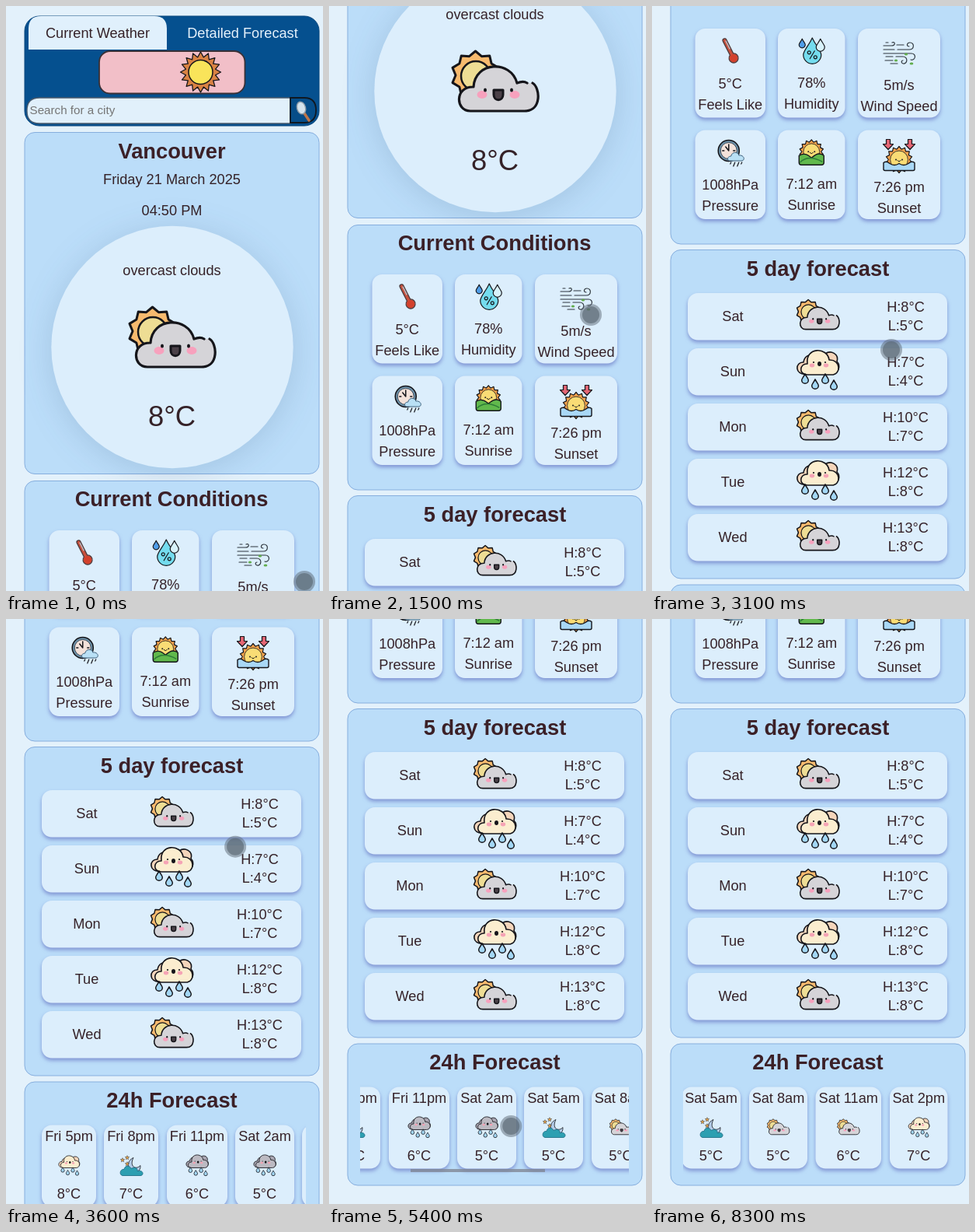
These frames come from a looping animation (408 by 752 pixels, 8400 ms). An HTML page:

```html
<!DOCTYPE html>
<html lang="en">
<head>
<meta charset="utf-8">
<title>Weather</title>
<style>
  html, body { margin: 0; width: 100%; height: 100%; overflow: hidden; background: #e3f1fb; }
  svg { display: block; width: 100%; height: 100%; }
  text { font: 18.2px "Liberation Sans", Arial, sans-serif; fill: #352228; text-anchor: middle; }
  .title { font-size: 27.3px; font-weight: bold; fill: #3b2027; }
  .big { font-size: 36.4px; }
  .panel { fill: #bbddf9; stroke: #86aede; }
  .card { fill: #dceefc; filter: drop-shadow(0 3px 2.5px rgba(80, 90, 180, .55)); }
  .disc { fill: #dceefc; filter: drop-shadow(0 5px 20px rgba(40, 70, 110, .17)); }
  .line { fill: none; stroke: #15151a; stroke-linecap: round; stroke-linejoin: round; }
  .ink { stroke: #15151a; stroke-linejoin: round; }
</style>
</head>
<body>
<svg id="stage" viewBox="0 0 408 752"></svg>
<script>
const LOOP = 8400, STEP = 100;

// Markup helpers
const text = (s, x, y, cls = '', extra = '') => `<text x="${x}" y="${y}" class="${cls}" ${extra}>${s}</text>`;
const rect = (x, y, w, h, r, attrs) => `<rect x="${x}" y="${y}" width="${w}" height="${h}" rx="${r}" ${attrs}/>`;
const card = (x, y, w, h) => rect(x, y, w, h, 13, 'class="card"');
const panel = (y, h) => rect(24, y, 379, h, 13, 'class="panel"');
const dot = (x, y, rx, fill, ry = rx) => `<ellipse cx="${x}" cy="${y}" rx="${rx}" ry="${ry}" fill="${fill}"/>`;
const path = (d, attrs) => `<path d="${d}" ${attrs}/>`;
const place = (art, x, y, scale = 1) => `<g transform="translate(${x} ${y}) scale(${scale})">${art}</g>`;

function star(cx, cy, points, outer, inner, attrs) {
  let d = '';
  for (let i = 0; i < points * 2; i++) {
    const r = i % 2 ? inner : outer, a = Math.PI * i / points - Math.PI / 2;
    d += `${i ? 'L' : 'M'}${(cx + r * Math.cos(a)).toFixed(1)} ${(cy + r * Math.sin(a)).toFixed(1)}`;
  }
  return path(d + 'Z', attrs);
}

function drop(x, y, r, fill, width = 1.2) {
  return path(`M${x} ${y - 1.9 * r}C${x + r * .4} ${y - r} ${x + r} ${y - r * .5} ${x + r} ${y}
    A${r} ${r} 0 0 1 ${x - r} ${y}C${x - r} ${y - r * .5} ${x - r * .4} ${y - r} ${x} ${y - 1.9 * r}Z`,
    `class="ink" fill="${fill}" stroke-width="${width}"`);
}

// Icons
const cloudPath = 'M106 42C116 48 118 78 96 78H26C6 78 6 46 30 47C32 14 78 12 86 42C91 40 96 40 99 42';
const sunCloud =
  star(32.5, 32, 10, 31, 25.5, 'class="ink" fill="#f7ba6e" stroke-width="3"') +
  `<circle cx="33" cy="33" r="19" class="ink" fill="#eedd94" stroke-width="2.5"/>` +
  path(cloudPath, 'fill="#d5d4d8"') + path(cloudPath, 'class="line" stroke-width="3.2"') +
  dot(41, 57, 6.5, '#f7a1bd', 5) + dot(83, 57, 6.5, '#f7a1bd', 5) +
  dot(45, 51, 2, '#15151a', 2.5) + dot(79, 51, 2, '#15151a', 2.5) +
  path('M56 51H68V57C68 66 56 66 56 57Z', 'class="ink" fill="#4b4148" stroke-width="3"');

const rainCloud = (body, back) =>
  path('M14 31C-2 33-1 15 10 16C11 8 18 5 22 8L38 5C45 0 56 5 53 15C58 20 56 31 46 30Z',
    `class="ink" fill="${back}" stroke-width="1.6"`) +
  path('M15 32C3 32 5 17 15 18C12-4 41-4 43 13C58 12 59 32 46 32Z',
    `class="ink" fill="${body}" stroke-width="1.6"`) +
  dot(21, 20, 3.2, '#f5a3b5', 2.4) + dot(39, 20, 3.2, '#f5a3b5', 2.4) +
  dot(23, 16, 1.1, '#15151a') + dot(38, 16, 1.1, '#15151a') + dot(30.5, 18, 2.5, '#15151a', 3) +
  [[12, 39], [25, 46], [38, 39], [49, 47]].map(([x, y]) => drop(x, y, 4.3, '#a3d7f5', 1.5)).join('');
const rain = rainCloud('#fbedcf', '#f4d5bb');
const greyRain = rainCloud('#bcbac2', '#a9a6b2');

const moon =
  path('M17 3C11 15 21 19 26 13C27 25 11 24 10 14C10 8 13 5 17 3Z', 'class="ink" fill="#b4cdea" stroke-width=".8"') +
  path('M3 26C-2 25 0 17 5 18C6 12 13 13 14 17C19 14 23 17 22 20C30 18 31 26 26 26Z', 'fill="#2d9fb1" stroke="#18687f" stroke-width=".8"') +
  [[3, 6], [9, 3], [9, 11]].map(([x, y]) => star(x, y, 5, 2.8, 1.2, 'fill="#f0a742" stroke="#34343a" stroke-width=".5"')).join('');

const thermometer = `<g transform="rotate(-27)">` +
  path('M-2.4-16A2.4 2.4 0 0 1 2.4-16V4A6 6 0 1 1-2.4 4Z', 'fill="#c9503c" stroke="#4d3b3e" stroke-width="1.3"') +
  path('M1-15V-3', 'stroke="#b9bcc2" stroke-width="1.4"') + dot(0, 9.5, 5, '#d3412d') + '</g>';

const humidity = drop(1, 5, 11.5, '#74dcee') + drop(-12, -8, 4, '#4f9de8') + drop(11.5, -5, 5.5, '#d8f2fb') +
  path('M4 0L-2 10', 'class="line" stroke-width="1.2"') +
  `<g class="line" stroke-width="1.2"><circle cx="-3" cy="2" r="2"/><circle cx="5" cy="8" r="2"/></g>`;

const wind = path(`M-20-5H-6M-2-5H13C20-5 20-14 14-14C10-14 9-9 13-9M-20 0H16C23 0 21 10 15 8M-17 4H-8M-4 4H5
  C12 4 11 14 5 13C2 12 3 9 5 9M-20-10H-10C-4-10-5-16-9-14M-18 9H-8M-3-11H6M-11 13H-2M-17-14H-14`,
  'class="line" style="stroke:#2f373e" stroke-width="1.2"') +
  dot(-4, 9, 2.2, '#62ae4e', 1.5) + dot(9, 1, 2.2, '#62ae4e', 1.6) + dot(16, 13, 2.4, '#62ae4e', 1.6);

const pressure =
  `<circle cx="-2" cy="-3" r="13.5" class="ink" fill="#6f93ab" stroke-width="1.6"/>` +
  `<circle cx="-2" cy="-3" r="10.5" fill="#f3e2da" stroke="#3d4c59"/>` +
  path('M-2-11V-3L-6-8M-10-3H-8M4-3H6', 'class="line" stroke-width="1.5"') +
  path('M0 10C-5 10-4 4 1 4C2-2 10-2 11 3C18 2 20 10 14 10Z', 'fill="#b9e0f5" stroke="#40627d"') +
  path('M1 12L0 14M6 12L4 17M11 12L9 17M15 12L14 14', 'class="line" stroke-width="1.2"');

const sunFace = (y, r) =>
  star(0, y, 14, r, r * .8, 'class="ink" fill="#f4a34c" stroke-width="1.2"') +
  `<circle cy="${y}" r="${r * .67}" class="ink" fill="#f9dc75" stroke-width=".8"/>` +
  dot(-4, y, 1, '#222') + dot(4, y, 1, '#222') + path(`M-2 ${y + 1}Q0 ${y + 4} 2 ${y + 1}`, 'class="line"');

const sunrise = sunFace(-1, 15.5) +
  path('M-16 4Q-8-1 0 7Q9-2 16 4V13Q16 16 13 16H-13Q-16 16-16 13Z', 'class="ink" fill="#61b94c" stroke-width="1.4"') +
  path('M-15 13Q-4 2 14 12', 'fill="none" stroke="#2d7b38" stroke-width="1.4"');

const arrow = 'M-2.5-19H2.5V-13H6.5L0-6L-6.5-13H-2.5Z';
const sunset = sunFace(6, 17) +
  path('M-20 10Q-16 7-12 11Q-6 15 0 11Q6 15 12 11Q16 7 20 10V18Q20 20 18 20H-18Q-20 20-20 18Z', 'class="ink" fill="#a9d8f6" stroke-width="1.4"') +
  [-14, 14].map(x => place(path(arrow, 'class="ink" fill="#e56775" stroke-width="1.2"'), x, -1)).join('');

// Page sections
const header =
  rect(24, 13, 379, 141, 19, 'fill="#05508f" stroke="#0b477d"') +
  path('M29 56V29Q29 13 45 13H191Q207 13 207 29V56Z', 'fill="#e0f0fc"') +
  text('Current Weather', 118, 41) +
  text('Detailed Forecast', 304.5, 41, '', 'style="fill:#e5f1fb"') +
  rect(120, 58, 187.5, 54.5, 14, 'fill="#f2bfc8" stroke="#3a3036" stroke-width="1.8"') +
  star(250.5, 85, 16, 26, 19.5, 'class="ink" fill="#d98243" stroke-width="1.3"') +
  `<circle cx="250.5" cy="85" r="15.5" class="ink" fill="#f9e45a" stroke-width="1.5"/>` +
  path('M366 118V151H43Q27 151 27 135V134Q27 118 43 118Z', 'fill="#e1f0fb" stroke="#47586b" stroke-width="1.3"') +
  text('Search for a city', 30.5, 139, '', 'style="font-size:15.2px;fill:#757575;text-anchor:start"') +
  path('M366 118H384Q399 118 399 134Q399 150 384 150H366Z', 'fill="#064d88" stroke="#101821" stroke-width="1.8"') +
  path('M384 138L390 147', 'stroke="#bd7548" stroke-width="3.5" stroke-linecap="round"') +
  `<ellipse cx="380" cy="131" rx="5.5" ry="8" transform="rotate(-15 380 131)" fill="#d5e3ec" stroke="#8d9ca8" stroke-width="1.5"/>`;

const today = panel(162.5, 439) + text('Vancouver', 213.5, 196, 'title') +
  text('Friday 21 March 2025', 213.5, 229) + text('04:50 PM', 213.5, 269) +
  '<circle cx="214" cy="438.5" r="155.7" class="disc"/>' +
  text('overcast clouds', 213.5, 346) + place(sunCloud, 156, 386) + text('8°C', 213.5, 540, 'big');

const columns = [[55.5, 90.5, 0], [162, 86.5, -.7], [265, 106, 2.5]];
const conditions = [
  [thermometer, '5°C', 'Feels Like'], [humidity, '78%', 'Humidity'], [wind, '5m/s', 'Wind Speed'],
  [pressure, '1008hPa', 'Pressure'], [sunrise, '7:12 am', 'Sunrise'], [sunset, '7:26 pm', 'Sunset'],
].map(([icon, value, label], i) => {
  const [x, w, dy] = columns[i % 3], y = i < 3 ? 674 : 804.5, mid = x + w / 2;
  return card(x, y, w, 114.5) + place(icon, mid, y + 29.5 + dy) +
    text(value, mid, Math.floor(y + 77 + dy)) + text(label, mid, Math.floor(y + 104 + dy));
}).join('');

const days = [['Sat', 8, 5], ['Sun', 7, 4], ['Mon', 10, 7], ['Tue', 12, 8], ['Wed', 13, 8]]
  .map(([day, high, low], i) => {
    const y = 1014 + 71 * i;
    return card(46, y, 334, 60.5) + text(day, 104, y + 36) +
      (i % 2 ? place(rain, 185, y + 2) : place(sunCloud, 185, y + 8, .495)) +
      text(`H:${high}°C`, 326.5, y + 24) + text(`L:${low}°C`, 326.5, y + 48);
  }).join('');

const smallRain = place(rain, -14, -13, .5), smallGrey = place(greyRain, -15, -14, .53);
const smallSun = place(sunCloud, -15, -11, .26), smallMoon = place(moon, -14, -13);
const hours = [
  [46, 70, 'Fri 5pm', smallRain, 8], [126, 70, 'Fri 8pm', smallMoon, 7],
  [207, 78, 'Fri 11pm', smallGrey, 6], [295, 76, 'Sat 2am', smallGrey, 5],
  [381, 76, 'Sat 5am', smallMoon, 5], [468, 75, 'Sat 8am', smallSun, 5],
  [553.5, 84.5, 'Sat 11am', smallSun, 6], [649, 74.5, 'Sat 2pm', smallRain, 7],
].map(([x, w, label, icon, temp]) => {
  const mid = x + w / 2;
  return card(x, 1444.5, w, 105) + text(label, mid, 1465) + place(icon, mid, 1496.5) + text(temp + '°C', mid, 1539);
}).join('');

document.getElementById('stage').innerHTML = `
  <defs><clipPath id="stripClip"><rect x="40" y="1440" width="346" height="118"/></clipPath></defs>
  <g id="page">
    ${header}${today}
    ${panel(610.5, 340.5)}${text('Current Conditions', 213, 643, 'title')}${conditions}
    ${panel(958.5, 422.5)}${text('5 day forecast', 213.5, 992, 'title')}${days}
    ${panel(1389, 182)}${text('24h Forecast', 213.5, 1422, 'title')}
    <g clip-path="url(#stripClip)"><g id="strip">${hours}</g></g>
    <rect id="thumb" y="1550" width="173" height="4" fill="#7c828f" opacity="0"/>
  </g>
  <g id="touch"><circle r="14" fill="#5b6873" fill-opacity=".5"/><circle r="11" fill="#56646e" fill-opacity=".6"/></g>`;

// Motion: [time, value] points joined by straight lines
const scrollY = [[0, 0], [250, 0], [600, 60], [1000, 157], [1500, 329], [1800, 405], [2100, 420], [2450, 420], [2750, 500], [3100, 645], [3500, 770], [3800, 843]];
const scrollX = [[5000, 0], [5250, 70], [5800, 290], [6050, 343]];
const touchX = [[0, 384], [250, 384], [1000, 356], [1500, 337], [1800, 327], [2350, 343], [3100, 308], [3800, 290], [4200, 321], [4900, 372], [5000, 372], [5250, 294], [5800, 75], [6000, 35]];
const touchY = [[0, 740], [250, 735], [600, 667], [1000, 570], [1500, 397], [1800, 320], [2350, 675], [2750, 587], [3100, 442], [3500, 317], [3800, 244], [4200, 520], [4900, 652]];
const thumbAlpha = [[4950, 0], [5050, .75], [6300, .75], [6600, 0]];

function at(points, t) {
  const i = points.findIndex(p => p[0] > t);
  if (i === 0) return points[0][1];
  if (i < 0) return points[points.length - 1][1];
  const [t0, a] = points[i - 1], [t1, b] = points[i];
  return a + (b - a) * (t - t0) / (t1 - t0);
}

const [page, strip, thumb, touch] = ['page', 'strip', 'thumb', 'touch'].map(id => document.getElementById(id));
const move = (el, x, y) => el.setAttribute('transform', `translate(${x} ${y})`);
const start = performance.now();
let shown = -1;

function draw() {
  const t = Math.floor((performance.now() - start) % LOOP / STEP) * STEP;
  if (t !== shown) {
    shown = t;
    const x = at(scrollX, t);
    move(page, 0, -Math.round(at(scrollY, t)));
    move(strip, -x, 0);
    move(thumb, 40 + x / 2, 0);
    thumb.setAttribute('opacity', at(thumbAlpha, t));
    move(touch, at(touchX, t), at(touchY, t));
    touch.setAttribute('visibility', t > 6100 ? 'hidden' : 'visible');
  }
  requestAnimationFrame(draw);
}
draw();
</script>
</body>
</html>
```
